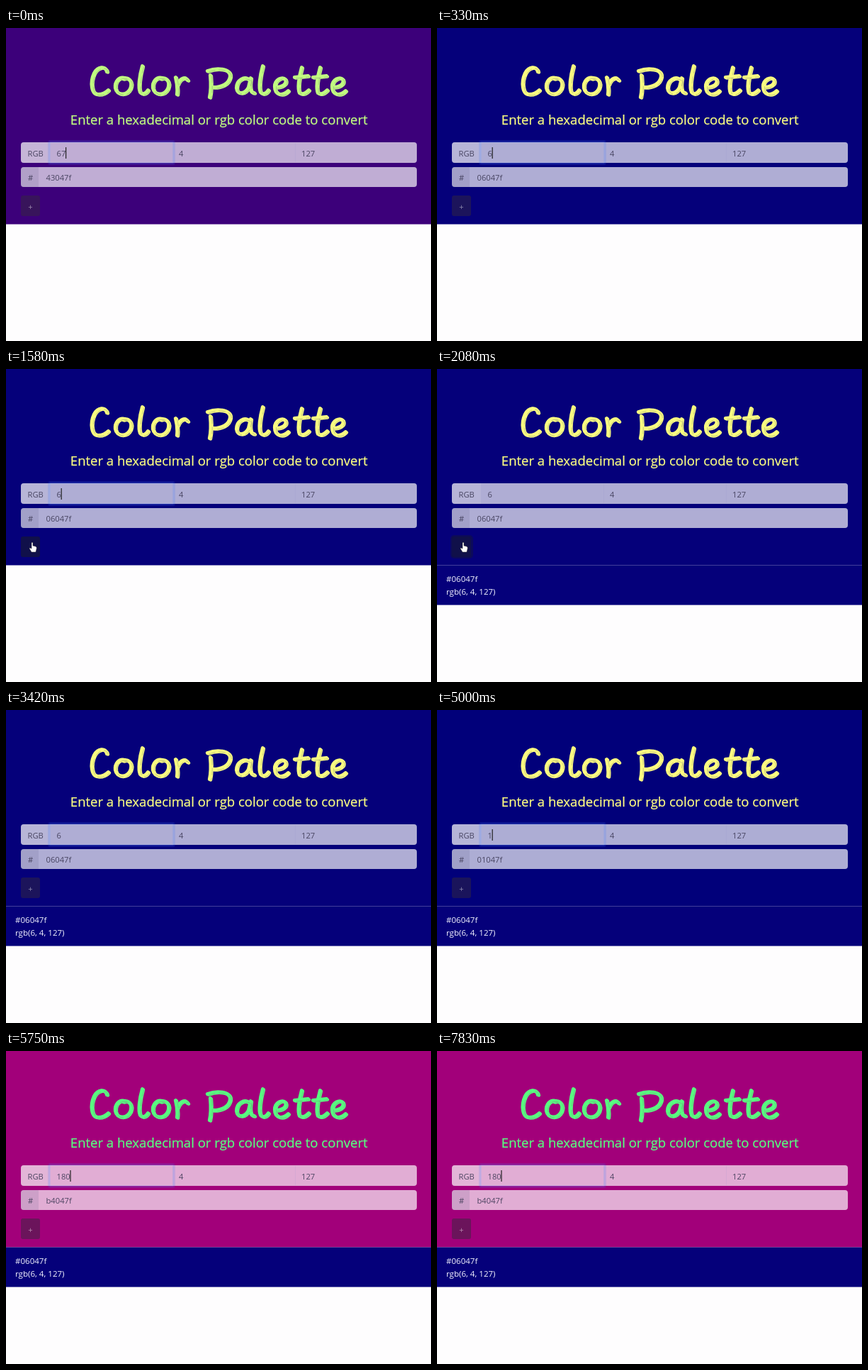
Animation of 600 by 441 pixels, one loop 8 s. Source, as an HTML page:

```html
<!DOCTYPE html>
<html lang="en">
<head>
<meta charset="utf-8">
<title>Color Palette</title>
<style>
html, body { margin: 0; width: 100%; height: 100%; overflow: hidden; background: #fefdfe; }
svg { display: block; width: 600px; height: 441px; font: 11.2px "Open Sans", "Noto Sans", sans-serif; }
.brush { fill: none; stroke-linecap: round; stroke-linejoin: round; }
.field { fill: #fff; fill-opacity: .68; }
.ink { fill: #3d3a55; fill-opacity: .9; }
.row { fill: #f4f4ff; font-size: 11.55px; }
</style>
</head>
<body>
<svg viewBox="0 0 600 441">
  <defs>
    <g id="letters">
      <path d="M143 62C141 53 130 55 125 64C119 77 121 94 131 94C137 94 142 91 145 88"/>
      <path id="o" d="M169 71C160 68 154 76 155 85C157 96 171 96 176 86C180 76 174 69 166 72"/>
      <path id="l" d="M193 54C189 68 187 84 190 91C193 95 198 93 201 88"/>
      <use href="#o" x="53"/>
      <path d="M240 70C242 78 243 86 242 94M243 80C246 72 253 68 257 74"/>
      <path d="M289 67C290 78 290 89 288 98M285 61C298 56 318 57 317 69C315 80 304 84 293 84"/>
      <path d="M345 74C337 67 326 74 326 85C327 95 338 94 343 84L346 71C344 82 345 92 351 92"/>
      <use href="#l" x="170"/>
      <path id="e" d="M381 84C389 84 398 80 395 73C391 68 380 73 380 83C380 95 391 97 399 89"/>
      <path id="t" d="M418 56C414 70 412 86 415 92C419 95 424 92 428 88M408 70L427 68"/>
      <use href="#t" x="26"/>
      <use href="#e" x="81"/>
    </g>
  </defs>

  <rect id="panel" width="600" height="276.5"/>
  <g role="img" aria-label="Color Palette" class="brush">
    <g id="title">
      <use href="#letters" x="-.6" y="-.4" stroke-width="5"/>
      <use href="#letters" x="1" y=".6" stroke-width="4.4"/>
    </g>
    <use id="streak" href="#letters" x="1.6" y="1" stroke-width=".7" stroke-opacity=".3" stroke-dasharray="9 5"/>
  </g>
  <text id="subtitle" x="300.7" y="136" text-anchor="middle" font-size="18.55" stroke-width=".25">Enter a hexadecimal or rgb color code to convert</text>

  <rect class="field" x="21" y="161" width="559" height="29" rx="4"/>
  <rect class="field" x="21" y="196" width="559" height="28" rx="4"/>
  <path fill="#e9ecef" fill-opacity=".12" d="M25 161H62V190H25Q21 190 21 186V165Q21 161 25 161Z"/>
  <path fill="#4a5078" fill-opacity=".13" d="M25 196H46V224H25Q21 224 21 220V200Q21 196 25 196Z"/>
  <path d="M235.5 162V189M408.5 162V189" stroke="#8c8cc8" stroke-opacity=".14"/>
  <g id="focus" fill="none">
    <rect x="60.5" y="159.5" width="177" height="32" rx="2" stroke="#3c78ff" stroke-opacity=".17" stroke-width="3"/>
    <rect x="62" y="161" width="174" height="29" stroke="#80aaff" stroke-opacity=".35"/>
  </g>
  <g class="ink">
    <text x="30.5" y="181">RGB</text>
    <text id="red" x="71.5" y="181"></text>
    <text x="244" y="181">4</text>
    <text x="417" y="181">127</text>
    <text x="31" y="215">#</text>
    <text id="hex" x="56.5" y="215"></text>
  </g>
  <rect id="caret" y="168" width="1.2" height="16" fill="#222"/>

  <rect id="ring" x="19" y="234" width="32" height="33" rx="5" fill="#0c0a5c"/>
  <rect id="button" x="21" y="236" width="27" height="29" rx="3"/>
  <text id="plus" x="34.5" y="256" text-anchor="middle" fill="#fff" fill-opacity=".5">+</text>

  <g id="row">
    <rect y="276.5" width="600" height="56" fill="#05007a"/>
    <text class="row" x="13" y="300">#06047f</text>
    <text class="row" x="13" y="318">rgb(6, 4, 127)</text>
  </g>

  <g id="mouse">
    <path id="hand" fill="#fff" stroke="#222" stroke-width=".5" d="M-2 -6Q-1 -8 0 -6V-2L4 -1Q6 0 5 3L4 7H-2L-5 2Q-5 0 -2 2Z"/>
    <path id="arrow" fill="#fff" stroke="#222" stroke-width=".6" d="M-2 -6V7L1 4L3 9L5 8L3 3H7Z"/>
    <path id="beam" fill="none" stroke="#333" d="M-2 -7H2M0 -7V7M-2 7H2"/>
  </g>
</svg>
<script>
const LOOP = 8000, BLINK = 500;
const PRESS = 1600, ADD = 1750, FOCUS = 2750;
const ui = {};
document.querySelectorAll('[id]').forEach(el => ui[el.id] = el);

const typed = [[0, '67'], [150, '6'], [4000, ''], [5000, '1'], [5170, '18'], [5720, '180']];
const path = [[950, 150, 178], [1400, 38, 251], [2300, 38, 251], [2700, 150, 178], [3200, 150, 178]];

const within = (t, a, b) => t >= a && t < b;
const show = (el, on) => el.setAttribute('visibility', on ? 'visible' : 'hidden');
const clamp = k => Math.min(1, Math.max(0, k));
const ease = k => k * k * (3 - 2 * k);
const fade = (t, from) => ease(clamp((t - from) / 150));

// The caret restarts its blink at every key press and at focus.
function caretVisible(t) {
  const last = Math.max(...[...typed.map(step => step[0]), FOCUS].filter(s => s <= t));
  return !within(t, PRESS, FOCUS) && (t - last) % (2 * BLINK) < BLINK;
}

function mouseAt(t) {
  const i = path.findIndex((p, n) => n < path.length - 1 && within(t, p[0], path[n + 1][0]));
  if (i < 0) return null;
  const [t0, x0, y0] = path[i], [t1, x1, y1] = path[i + 1];
  const k = ease((t - t0) / (t1 - t0));
  return [x0 + (x1 - x0) * k, y0 + (y1 - y0) * k];
}

function drawMouse(spot) {
  const [x, y] = spot || [-50, -50];
  const hover = within(x, 21, 49) && within(y, 236, 265);
  const overField = within(y, 161, 190) || within(y, 196, 224);
  ui.mouse.setAttribute('transform', `translate(${x} ${y})`);
  show(ui.hand, spot && hover);
  show(ui.beam, spot && overField);
  show(ui.arrow, spot && !hover && !overField);
  return hover;
}

function draw(t) {
  const value = typed.filter(step => step[0] <= t).pop()[1];
  const red = Number(value);
  const back = `rgb(${red * .9}, 0, 122)`;
  const front = `rgb(${255 - red * .93}, 252, 128)`;
  ui.panel.setAttribute('fill', back);
  ui.streak.setAttribute('stroke', back);
  ui.title.setAttribute('stroke', front);
  ui.subtitle.setAttribute('fill', front);
  ui.subtitle.setAttribute('stroke', front);
  ui.red.textContent = value;
  ui.hex.textContent = red.toString(16).padStart(2, '0') + '047f';

  ui.caret.setAttribute('x', 71.2 + 6.4 * value.length);
  show(ui.caret, caretVisible(t));
  const pressed = fade(t, PRESS) - fade(t, FOCUS);
  ui.focus.setAttribute('opacity', 1 - pressed);
  ui.ring.setAttribute('opacity', pressed);
  show(ui.row, t >= ADD);

  const hover = drawMouse(mouseAt(t));
  ui.button.setAttribute('fill', hover ? '#10104a' : 'rgba(52, 40, 60, .5)');
  show(ui.plus, !hover);
}

const start = performance.now();
function tick() {
  draw((performance.now() - start) % LOOP);
  requestAnimationFrame(tick);
}
tick();
</script>
</body>
</html>
```
